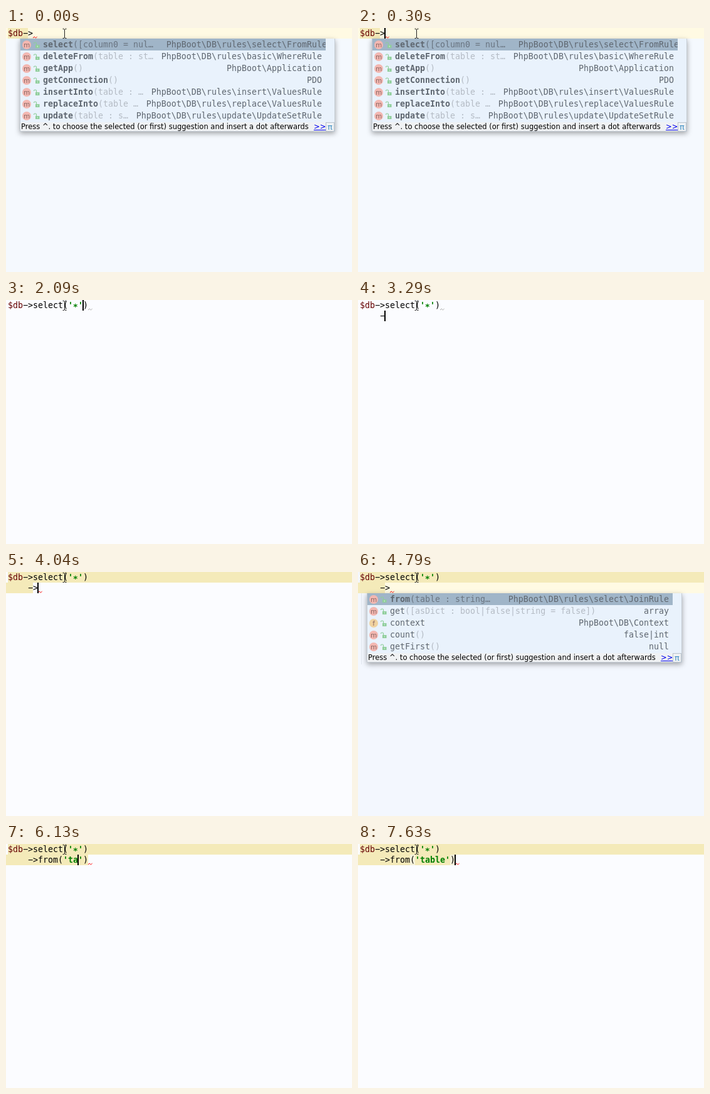
Recreate the animation shown at these times as an HTML page with a canvas. Size 552 by 391 pixels, loop 8 s.

```html
<!DOCTYPE html>
<html lang="en">
<head>
<meta charset="utf-8">
<title>Editor completion</title>
<style>
html, body { margin: 0; width: 100%; height: 100%; overflow: hidden; background: #fbfcff; }
canvas { display: block; }
</style>
</head>
<body>
<canvas id="stage" width="552" height="391"></canvas>
<script>
const ctx = document.getElementById('stage').getContext('2d');
const LOOP = 8000, CHAR = 8, LINE = 17, ROW = 19, LEFT = 3;
const MONO = '13.3px "DejaVu Sans Mono", monospace';
const SANS = '11.5px "DejaVu Sans", sans-serif';
const YELLOW = '#f4eab9', PALE = '#fffae3';

// Rows hold kind, name, parameters and type; the first boldRows names are bold.
const queryMenu = { x: 22, y: 17, boldRows: 7, overflow: 8, rows: [
  ['m', 'select', '([column0 = nul…', 'PhpBoot\\DB\\rules\\select\\FromRule'],
  ['m', 'deleteFrom', '(table : st…', 'PhpBoot\\DB\\rules\\basic\\WhereRule'],
  ['m', 'getApp', '()', 'PhpBoot\\Application'],
  ['m', 'getConnection', '()', 'PDO'],
  ['m', 'insertInto', '(table : …', 'PhpBoot\\DB\\rules\\insert\\ValuesRule'],
  ['m', 'replaceInto', '(table …', 'PhpBoot\\DB\\rules\\replace\\ValuesRule'],
  ['m', 'update', '(table : s…', 'PhpBoot\\DB\\rules\\update\\UpdateSetRule']
] };
const selectMenu = { x: 14, y: 34, boldRows: 1, overflow: 0, rows: [
  ['m', 'from', '(table : string…', 'PhpBoot\\DB\\rules\\select\\JoinRule'],
  ['m', 'get', '([asDict : bool|false|string = false])', 'array'],
  ['f', 'context', '', 'PhpBoot\\DB\\Context'],
  ['m', 'count', '()', 'false|int'],
  ['m', 'getFirst', '()', 'null']
] };

// Each step changes part of the editor state; caret and marked end are [line, column].
const steps = [
  [0, { lines: ['$db->', ''], caret: null, wave: [0, 5, 'red'], marked: [0, 4], menu: queryMenu, brace: false }],
  [300, { caret: [0, 5] }],
  [450, { lines: ['$db->select()', ''], caret: [0, 12], wave: [0, 13, '#aaa'], marked: null, menu: null }],
  [1190, { lines: ["$db->select('')", ''], caret: [0, 13], wave: [0, 15, '#aaa'] }],
  [1490, { lines: ["$db->select('*')", ''], caret: [0, 14], wave: [0, 16, '#aaa'] }],
  [2090, { caret: [0, 15] }],
  [2240, { caret: [0, 16] }],
  [2690, { caret: [1, 4] }],
  [3290, { lines: ["$db->select('*')", '    -'], caret: [1, 5] }],
  [3740, { marked: [1, 5], wave: [1, 5, 'red'] }],
  [4040, second('->', 6)],
  [4190, { menu: selectMenu }],
  [4790, { caret: null }],
  [4940, { ...second('->from()', 11), menu: null }],
  [5240, { marked: [1, 12] }],
  [5680, typed('', 12)],
  [5980, typed('t', 13)],
  [6130, typed('ta', 14)],
  [6730, typed('tab', 15)],
  [6880, typed('tabl', 16)],
  [7030, typed('table', 17)],
  [7480, { caret: [1, 18] }],
  [7630, { caret: [1, 19], brace: true }]
];

function second(code, column) {
  return {
    lines: ["$db->select('*')", '    ' + code],
    caret: [1, column],
    wave: [1, 4 + code.length, 'red']
  };
}

function typed(word, column) {
  const state = second(`->from('${word}')`, column);
  state.marked = [1, state.lines[1].length];
  return state;
}

function columnX(column) { return LEFT + column * CHAR; }

function box(x, y, w, h, color) {
  ctx.fillStyle = color;
  ctx.fillRect(x, y, w, h);
}

function text(value, x, y, color, font = MONO, align = 'left') {
  ctx.font = font;
  ctx.textAlign = align;
  ctx.fillStyle = color;
  ctx.fillText(value, x, y);
}

function stroke(color, width, points) {
  ctx.strokeStyle = color;
  ctx.lineWidth = width;
  ctx.beginPath();
  points.forEach(([x, y]) => ctx.lineTo(x, y));
  ctx.stroke();
}

function drawCode(code, line) {
  let column = 0;
  // Wide dash and centred star, as in the editor's typeface
  const glyphs = code.replace('-', '−').replace('*', '∗');
  for (const part of glyphs.split(/(\$db|'[^']*')/)) {
    const quoted = part[0] === "'";
    const color = quoted ? '#008000' : part === '$db' ? '#660000' : '#000';
    text(part, columnX(column), 13 + line * LINE, color, (quoted ? 'bold ' : '') + MONO);
    column += part.length;
  }
}

function drawMarked([line, column]) {
  if (line) box(LEFT, 0, 552, LINE, YELLOW);
  const start = line ? 0 : LEFT;
  box(start, line * LINE, columnX(column) - start, LINE, YELLOW);
}

function drawWave([line, column, color]) {
  const x = columnX(column), y = line * LINE + 16;
  stroke(color, 1, [0, 1, 2, 3].map(i => [x + i * 2.2, y - (i % 2) * 2]));
}

function drawPointer() {
  stroke('#222', 1, [[90.5, 1.5], [92.5, 1.5], [93.5, 3], [94.5, 1.5], [96.5, 1.5]]);
  stroke('#222', 1, [[93.5, 3], [93.5, 15]]);
  stroke('#222', 1, [[90.5, 16.5], [92.5, 16.5], [93.5, 15], [94.5, 16.5], [96.5, 16.5]]);
}

function drawIcons(kind, x, y) {
  ctx.fillStyle = kind === 'm' ? '#f3b7b1' : '#f0d3a0';
  ctx.beginPath();
  ctx.arc(x, y, 7, 0, 7);
  ctx.fill();
  text(kind, x, y + 3.5, '#8b6864', '10.5px "DejaVu Sans", sans-serif', 'center');
  box(x + 14, y, 6.5, 5, '#8fce9a');
  box(x + 16.7, y + 1.5, 1, 2, '#e9f3f4');
  ctx.strokeStyle = '#8fce9a';
  ctx.lineWidth = 1.2;
  ctx.beginPath();
  ctx.arc(x + 13.5, y - 2, 2, Math.PI, 0);
  ctx.lineTo(x + 15.5, y);
  ctx.stroke();
}

function drawMenu({ x, y, rows, boldRows, overflow }) {
  const footer = y + 1 + rows.length * ROW;
  ctx.save();
  ctx.shadowColor = 'rgba(0,0,0,.35)';
  ctx.shadowBlur = 8;
  ctx.shadowOffsetY = 3;
  box(x, y, 503, footer + 15 - y, '#c5ccd4');
  ctx.restore();
  box(x + 1, y, 501, footer - y, '#e9f2fc');
  box(x + 1, y, 487, ROW, '#a0b5c8');
  ctx.save();
  ctx.beginPath();
  ctx.rect(x, y, 488, footer - y);
  ctx.clip();
  rows.forEach(([kind, name, params, type], i) => {
    const middle = y + 10 + i * ROW, base = middle + 4;
    drawIcons(kind, x + 11, middle);
    text(name, x + 37, base, '#5f6770', (i < boldRows ? 'bold ' : '') + MONO);
    text(params, x + 37 + name.length * CHAR, base, i ? '#b4bbc4' : '#697480');
    text(type, x + 482 + (i ? 0 : overflow), base, '#5f6770', MONO, 'right');
  });
  ctx.restore();
  box(x + 1, footer, 501, 14, '#f0f2f4');
  text('Press ^. to choose the selected (or first) suggestion and insert a dot afterwards',
    x + 2, footer + 11, '#000', SANS);
  text('>>', x + 469, footer + 11, '#0000ee', SANS);
  box(x + 469, footer + 12, 19, 1, '#0000ee');
  ctx.strokeStyle = '#b9c4ce';
  ctx.lineWidth = 1;
  ctx.strokeRect(x + 488.5, footer + 0.5, 13, 14);
  text('π', x + 495, footer + 11.5, '#3d8fc4', '13px "DejaVu Sans", sans-serif', 'center');
}

function draw(time) {
  const state = {};
  for (const [start, change] of steps) if (start <= time) Object.assign(state, change);
  const { lines, caret, wave, marked, menu, brace } = state;

  box(0, 0, 552, 391, menu === queryMenu ? '#f5f9fe' : menu ? '#f3f7fe' : '#fbfcff');
  if (menu) box(0, menu === queryMenu ? 0 : LINE, 552, LINE, PALE);
  if (marked) drawMarked(marked);
  if (brace) [10, 18].forEach(column => box(columnX(column), LINE, CHAR, LINE, '#f6f2da'));
  if (menu === selectMenu) box(5, 34, 1, 114, '#e2e7ef');

  lines.forEach(drawCode);
  drawWave(wave);
  if (caret) box(columnX(caret[1]) - 1, caret[0] * LINE, 2, LINE, '#000');
  if (menu) drawMenu(menu);
  drawPointer();
}

function tick() {
  draw(performance.now() % LOOP);
  requestAnimationFrame(tick);
}
tick();
</script>
</body>
</html>
```
